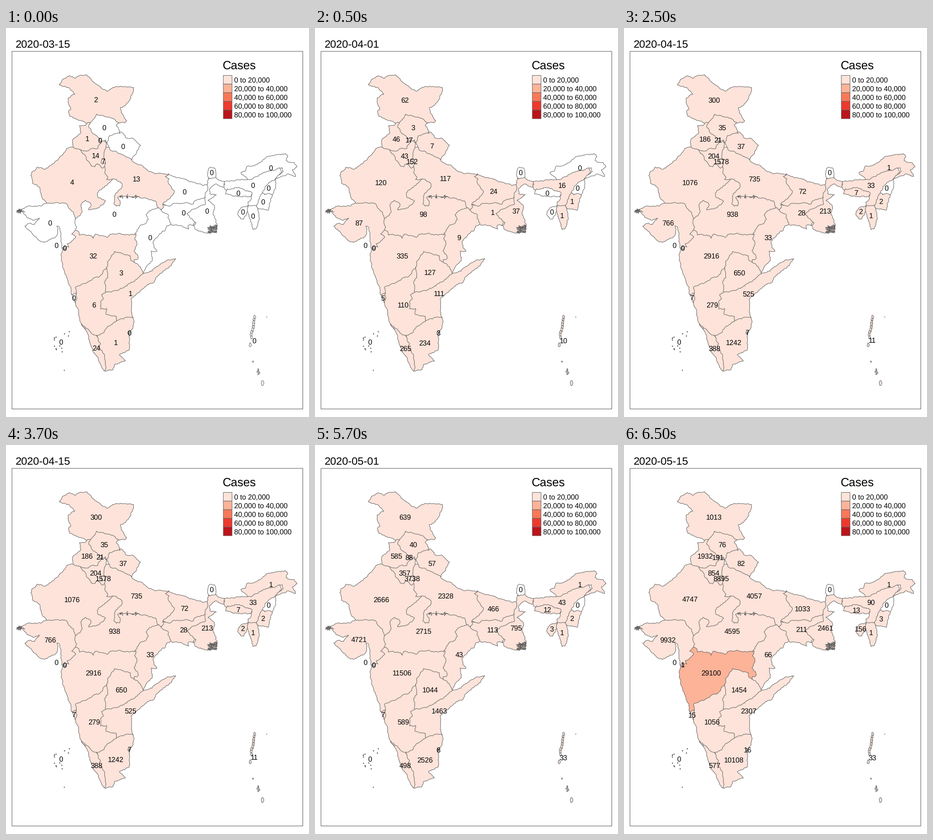
Write a matplotlib script that moves like this. It is 660 by 849 pixels and loops after 8000 ms.

```python
import numpy as np
import matplotlib.pyplot as plt
from matplotlib.animation import FuncAnimation
from matplotlib.collections import LineCollection
from matplotlib.patches import Polygon, Rectangle

W, H, DPI = 660, 849, 100
LINE, EDGE = "#636363", 0.74
SHADES = ["#fde3d9", "#fcb398", "#fb7858", "#ee392d", "#bb141a"]
DATES = ["2020-03-15", "2020-04-01", "2020-04-15", "2020-05-01", "2020-05-15"]
STEP, LOOP = 500, 8000

plt.rcParams["font.family"] = "Liberation Sans"
plt.rcParams["text.hinting"] = "none"
fig = plt.figure(figsize=(W / DPI, H / DPI), dpi=DPI, facecolor="white")
ax = fig.add_axes([0, 0, 1, 1])
ax.set(xlim=(0, W), ylim=(H, 0))
ax.axis("off")

rng = np.random.default_rng(7)
regions = []


def write(x, y, text, px, ha="left"):
    """Place text with its digits centred on y."""
    return ax.text(x, y + 0.35 * px, text, fontsize=px * 72 / DPI, ha=ha,
                   va="baseline", color="black", zorder=100)


def roughen(points):
    """Split the sides of an outline at displaced midpoints, as in a survey."""
    for _ in range(5):
        out = []
        for a, b in zip(points, np.roll(points, -1, axis=0)):
            out.append(a)
            dx, dy = b - a
            size = np.hypot(dx, dy)
            if size > 3.5:
                shift = rng.uniform(-1, 1) * min(0.2 * size, 1.5) / size
                out.append((a + b) / 2 + shift * np.array([-dy, dx]))
        points = np.array(out)
    return points


def blob(x, y, rx, ry):
    a = np.arange(0, 2 * np.pi, 0.7)
    r = rng.uniform(0.65, 1.15, a.size)
    return np.column_stack([x + rx * r * np.cos(a), y + ry * r * np.sin(a)])


def region(x, y, counts, outlines):
    """A labelled region; each one is painted over the ones before it."""
    shapes = [Polygon(o, lw=EDGE, ec=LINE, joinstyle="round",
                      zorder=1 + len(regions)) for o in outlines]
    for shape in shapes:
        ax.add_patch(shape)
    regions.append((counts, shapes, write(x, y, "", 15.5, "center")))


def state(x, y, counts, *xy):
    """Sides hidden below later neighbours are only sketched."""
    region(x, y, counts, [roughen(np.array(xy, float).reshape(-1, 2))])


def islands(x, y, counts, *blobs):
    region(x, y, counts, [blob(*b) for b in blobs])


def scribble(x0, x1, y0, y1, n):
    """Dense creeks and islets."""
    start = np.column_stack([rng.uniform(x0, x1, n), rng.uniform(y0, y1, n)])
    lines = start[:, None] + np.cumsum(rng.normal(0, 1.2, (n, 5, 2)), axis=1)
    ax.add_collection(LineCollection(lines, colors=LINE, lw=0.8, zorder=60))


# Centre, west and east
state(236, 406, (0, 98, 938, 2715, 4595),
      140, 395, 165, 370, 195, 350, 225, 320, 270, 345, 325, 365, 335, 405,
      300, 470, 220, 470, 160, 465, 135, 440)
state(144, 337, (4, 120, 1076, 2666, 4747),
      146, 260, 135, 262, 105, 295, 86, 308, 67, 304, 54, 322, 58, 339,
      72, 347, 78, 370, 88, 382, 100, 395, 140, 412, 152, 416, 161, 410,
      166, 400, 163, 386, 173, 376, 185, 384, 180, 397, 198, 393, 217, 378,
      200, 369, 199, 360, 226, 337, 240, 320, 225, 300, 205, 280, 175, 255)
state(314, 457, (0, 9, 33, 43, 66),
      331, 393, 312, 399, 305, 408, 310, 418, 304, 427, 293, 430, 285, 445,
      270, 470, 270, 520, 285, 538, 299, 536, 306, 521, 319, 506, 316, 487,
      329, 487, 323, 480, 321, 465, 334, 450, 346, 443, 350, 432, 361, 428,
      365, 410, 350, 395, 335, 385)
state(389, 357, (0, 24, 72, 466, 1033),
      354, 318, 372, 327, 384, 328, 400, 336, 420, 340, 430, 344, 440, 341,
      441, 352, 437, 366, 420, 390, 360, 395, 335, 380, 350, 350, 345, 330)
state(387, 403, (0, 1, 28, 113, 211),
      338, 385, 355, 389, 362, 384, 408, 384, 412, 377, 430, 372, 437, 366,
      442, 380, 425, 400, 415, 415, 408, 431, 397, 431, 398, 439, 382, 431,
      361, 430, 353, 415, 353, 407, 338, 397)
state(190, 497, (32, 335, 2916, 11506, 29100),
      130, 460, 146, 446, 148, 440, 156, 443, 160, 452, 186, 453, 190, 459,
      194, 450, 220, 457, 228, 450, 284, 450, 280, 460, 285, 466, 279, 487,
      287, 496, 287, 504, 279, 506, 278, 514, 240, 520, 215, 545, 180, 575,
      143, 582, 128, 535, 121, 502, 122, 480)
state(284, 329, (13, 117, 735, 2328, 4057),
      212, 262, 235, 260, 270, 280, 274, 288, 306, 309, 327, 318, 354, 319,
      347, 324, 355, 329, 353, 336, 367, 356, 362, 366, 342, 383, 343, 392,
      337, 397, 331, 392, 325, 377, 306, 372, 286, 368, 249, 367, 243, 370,
      249, 378, 248, 388, 240, 389, 235, 384, 238, 362, 252, 348, 252, 339,
      240, 330, 219, 331, 222, 325, 215, 316, 215, 303, 208, 280)
state(96, 425, (0, 87, 766, 4721, 9932),
      88, 382, 128, 382, 139, 395, 146, 401, 152, 416, 150, 426, 154, 434,
      143, 450, 152, 456, 143, 465, 133, 471, 137, 478, 122, 480, 116, 434,
      111, 432, 112, 450, 106, 458, 84, 468, 72, 464, 41, 432, 54, 426,
      62, 429, 73, 415, 58, 419, 46, 414, 38, 404, 27, 397, 48, 389, 78, 388)
state(438, 399, (0, 37, 213, 795, 2461),
      441, 328, 457, 325, 463, 332, 476, 335, 475, 347, 455, 341, 444, 350,
      444, 362, 458, 364, 440, 376, 454, 390, 451, 404, 460, 430, 459, 447,
      434, 447, 413, 440, 408, 431, 414, 425, 394, 405, 410, 395, 433, 386,
      434, 360, 440, 350, 439, 334)

# North
state(196, 157, (2, 62, 300, 639, 1013),
      246, 207, 258, 207, 263, 202, 253, 187, 249, 174, 262, 166, 272, 152,
      278, 130, 250, 127, 232, 130, 220, 138, 190, 117, 176, 102, 162, 103,
      150, 110, 138, 104, 123, 112, 116, 124, 138, 131, 150, 144, 135, 154,
      141, 178, 136, 182, 139, 193, 176, 208, 195, 212, 235, 212)
state(195, 279, (14, 43, 204, 357, 854),
      158, 262, 172, 277, 187, 302, 193, 303, 199, 296, 211, 306, 215, 303,
      213, 280, 219, 254, 212, 240, 195, 245, 175, 258)
state(177, 242, (1, 46, 186, 585, 1932),
      176, 208, 172, 213, 160, 213, 163, 227, 145, 245, 146, 260, 165, 267,
      180, 268, 190, 262, 200, 263, 207, 248, 200, 225, 184, 206)
state(255, 258, (0, 7, 37, 57, 82),
      254, 229, 262, 240, 275, 240, 293, 256, 274, 288, 245, 274, 226, 265,
      220, 251, 215, 235, 235, 222)
state(214, 217, (0, 3, 35, 40, 76),
      184, 206, 197, 188, 231, 197, 246, 207, 240, 212, 249, 230, 234, 232,
      225, 235, 220, 251, 217, 244, 207, 248, 193, 232, 180, 215)

# North-east
state(448, 315, (0, 0, 0, 0, 0),
      441, 328, 439, 318, 441, 307, 447, 304, 455, 306, 457, 325)
state(538, 343, (0, 16, 33, 43, 90),
      476, 335, 526, 331, 550, 312, 590, 295, 600, 315, 580, 340, 560, 380,
      540, 395, 527, 388, 527, 380, 534, 374, 536, 364, 485, 358, 475, 347)
state(577, 305, (0, 0, 1, 1, 1),
      526, 331, 512, 315, 522, 312, 524, 303, 548, 297, 567, 281, 608, 274,
      614, 281, 610, 289, 628, 294, 634, 303, 624, 309, 631, 324, 612, 319,
      587, 329, 604, 313, 602, 305, 560, 316, 537, 329)
state(506, 360, (0, 0, 7, 12, 13),
      478, 362, 505, 368, 533, 368, 536, 360, 508, 348, 482, 351)
state(572, 349, (0, 0, 0, 0, 0),
      587, 329, 567, 344, 558, 360, 564, 364, 580, 364, 588, 340)
state(560, 379, (0, 1, 2, 2, 3),
      558, 360, 545, 387, 548, 393, 571, 398, 580, 364, 572, 361, 564, 364)
state(538, 410, (0, 1, 1, 1, 1),
      548, 393, 551, 405, 550, 420, 545, 438, 538, 440, 529, 412, 524, 395,
      527, 388, 545, 387)
state(516, 401, (0, 0, 2, 3, 156),
      527, 388, 517, 390, 508, 397, 505, 405, 512, 417, 518, 417, 526, 401)

# South
state(192, 604, (6, 110, 279, 589, 1056),
      153, 579, 152, 565, 176, 556, 192, 545, 203, 543, 220, 521, 235, 540,
      250, 610, 250, 630, 240, 660, 215, 680, 190, 680, 165, 646, 151, 600,
      149, 588)
state(271, 580, (1, 111, 525, 1463, 2307),
      217, 577, 208, 582, 212, 592, 206, 599, 206, 613, 219, 612, 218, 625,
      240, 629, 241, 643, 260, 645, 277, 633, 273, 590, 288, 578, 308, 560,
      320, 557, 327, 544, 350, 525, 370, 504, 352, 506, 335, 517, 318, 531,
      299, 536, 270, 540, 235, 560)
state(251, 534, (3, 127, 650, 1044, 1454),
      220, 521, 221, 510, 236, 488, 271, 497, 272, 507, 288, 517, 299, 536,
      283, 549, 268, 558, 245, 572, 217, 577, 215, 556, 222, 545)
state(197, 699, (24, 265, 388, 498, 577),
      165, 646, 186, 666, 197, 671, 215, 690, 220, 735, 216, 749, 208, 740,
      193, 710, 180, 675)
state(239, 687, (1, 234, 1242, 2526, 10108),
      197, 671, 214, 664, 221, 652, 246, 637, 265, 631, 277, 633, 276, 656,
      269, 664, 269, 702, 247, 713, 260, 727, 236, 735, 233, 746, 216, 749,
      216, 727, 213, 711, 203, 698, 206, 690)
state(148, 589, (0, 5, 7, 7, 15), 143, 582, 153, 579, 154, 592, 151, 600)

# Small territories and islands
islands(205, 245, (0, 17, 21, 88, 191), (206, 244, 3, 4))
islands(212, 291, (7, 152, 1578, 3738, 8895), (212, 291, 5, 6))
islands(110, 474, (0, 0, 0, 0, 0))
islands(128, 480, (0, 0, 0, 0, 1), (127, 480, 3.5, 4), (129, 479, 2, 4))
islands(269, 665, (0, 3, 7, 8, 16), (268, 665, 3, 3), (267, 665, 2, 2))
islands(120, 685, (0, 0, 0, 0, 0), (127, 747, 0.8, 0.8),
        *[(rng.uniform(101, 149), rng.uniform(656, 708), 0.8, 1.1)
          for _ in range(13)])
islands(541, 682, (0, 10, 11, 33, 33),
        *[(542 - i + rng.uniform(-1, 1), 631 + 5.5 * i, 2.5, 4.5)
          for i in range(9)],
        (532, 692, 2.5, 4.5), (568, 631, 0.5, 0.5), (538, 728, 1.4, 1.5),
        *[(549 + rng.uniform(-4, 4), 745 + 2.5 * i, 1.4, 2) for i in range(5)],
        (559, 775, 3, 5.5))
scribble(27, 35, 396, 403, 22)
scribble(442, 459, 432, 447, 75)
scribble(246, 290, 366, 370, 16)

# Frame, title and legend
ax.add_patch(Rectangle((13, 51), 633.5, 780.5, fill=False, ec="#555555",
                       lw=0.75, snap=False, zorder=90))
title = write(21, 34.5, "", 23.4)
write(472, 81, "Cases", 25.8)
for i, shade in enumerate(SHADES):
    top = 103.5 + 18.9 * i
    ax.add_patch(Rectangle((473.3, top), 19, 18.9, fc=shade, ec=LINE,
                           lw=EDGE, snap=False))
    low = f"{20000 * i:,}" if i else "0"
    write(497, top + 10, f"{low} to {20000 * (i + 1):,}", 15.5)


def update(frame):
    day = (frame + 3) // 4
    title.set_text(DATES[day])
    for counts, shapes, label in regions:
        n = counts[day]
        label.set_text(str(n))
        for shape in shapes:
            shape.set_facecolor(SHADES[n // 20000] if n else "white")
    return []


anim = FuncAnimation(fig, update, frames=LOOP // STEP, interval=STEP,
                     repeat=True, repeat_delay=0, blit=False)
plt.show()
```
